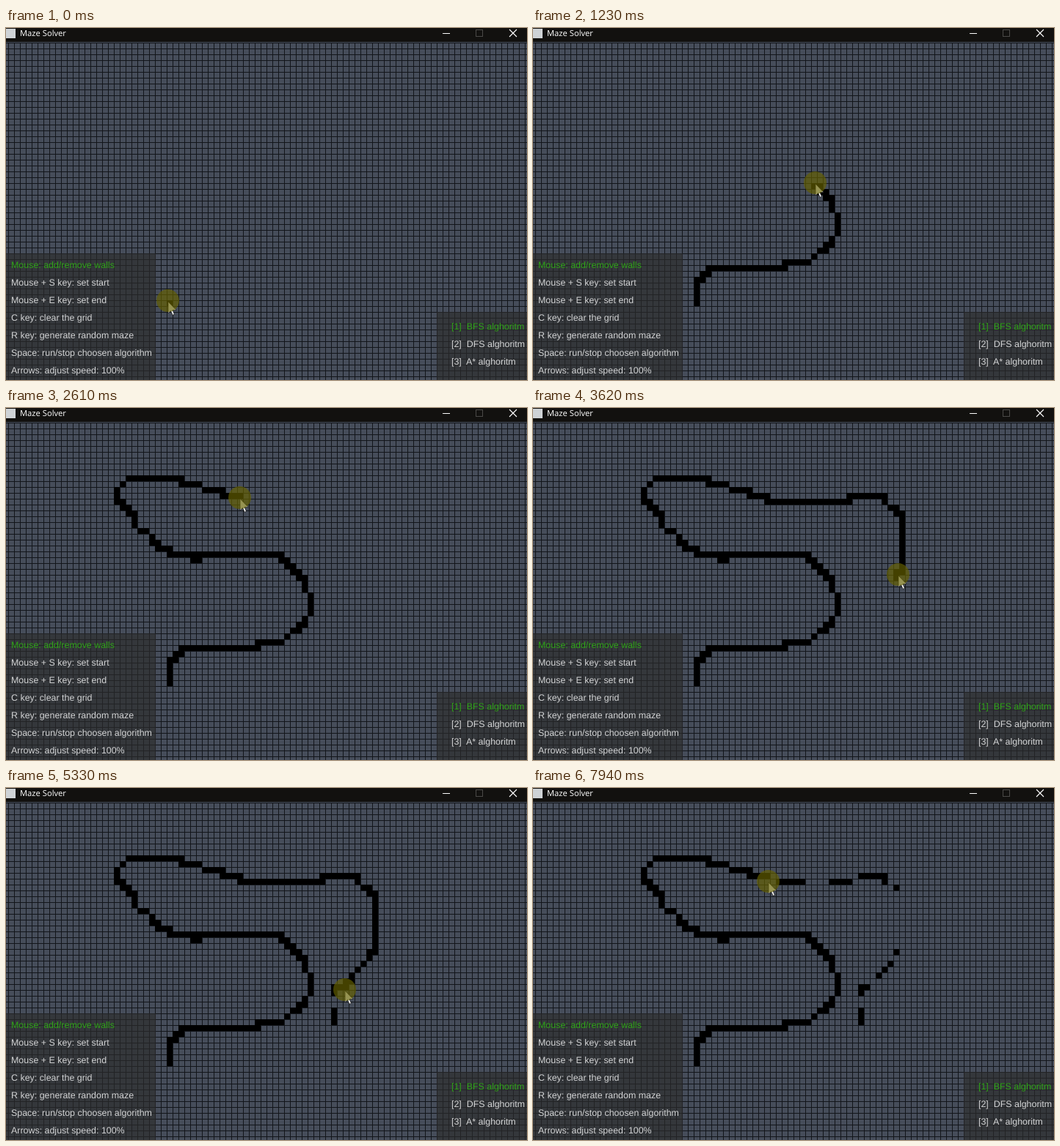
An HTML page that plays this animation: 710x481 px, repeating every 8 s.

```html
<!DOCTYPE html>
<html lang="en">
<head>
<meta charset="utf-8">
<title>Maze Solver</title>
<style>
  html, body { margin: 0; width: 100%; height: 100%; overflow: hidden; background: #464d5a; }
  svg { display: block; }
  text { white-space: pre; text-rendering: geometricPrecision; }
  .title { font: 11.2px "Open Sans", sans-serif; fill: #fff; }
  .help { font: 12.43px "Liberation Sans", Arial, sans-serif; fill: #d2d3d4; }
  .help.on { fill: #2fa318; }
  .panel { fill: rgba(44, 44, 44, .65); }
</style>
</head>
<body>
<svg id="stage" width="710" height="481" viewBox="0 0 710 481">
  <defs>
    <pattern id="grid" x="3" y="20" width="8" height="8" patternUnits="userSpaceOnUse">
      <path d="M0 0H8V1H1V8H0Z" fill="#12151a" shape-rendering="crispEdges"/>
    </pattern>
  </defs>
  <rect width="710" height="481" fill="#464d5a"/>
  <rect y="20" width="710" height="461" fill="url(#grid)"/>
  <g id="walls" shape-rendering="crispEdges"></g>
  <rect class="panel" y="308" width="204" height="173"/>
  <rect class="panel" x="587" y="388" width="123" height="93"/>
  <g id="labels"></g>

  <rect width="710" height="19" fill="#12110f"/>
  <rect y="1" width="13" height="13" fill="#cfd3d6"/>
  <text class="title" x="19" y="11">Maze Solver</text>
  <g fill="none" stroke="#fff">
    <path d="M595 7.5H605"/>
    <rect x="640.5" y="2.5" width="9" height="9" stroke="#4b4a48"/>
    <path d="M686 2L696 12M696 2L686 12" stroke-width="1.1"/>
  </g>

  <g id="cursor">
    <path d="M1 1V16.8L4.6 13.4L7.1 19.3L9.4 18.3L7 12.5H12Z" fill="#fff" stroke="#111" stroke-width=".7"/>
    <circle cx=".5" cy="-.5" r="15.5" fill="rgb(100,96,0)" fill-opacity=".68"/>
  </g>
</svg>
<script>
const LOOP = 8000, STEP = 77.1, CELL = 8, LEFT = 3, TOP = 20;
const SVG = "http://www.w3.org/2000/svg";
const byId = id => document.getElementById(id);

function make(tag, attrs) {
  const el = document.createElementNS(SVG, tag);
  for (const key in attrs) el.setAttribute(key, attrs[key]);
  return el;
}

// One stretch of the pointer's route, run at constant speed between two steps.
function leg(from, to, tool, d) {
  const path = make("path", { d });
  return { from, to, tool, path, length: path.getTotalLength() };
}

const legs = [
  leg(0, 16, "draw", `M220 373L224 346 240 328 346 324 379 316 408 290 412 281
    411.4 254.4 406 232 384 212`),
  leg(16, 34, "draw", `M384 212L376 204 363 199 267 203 258 206 248 202 225 197
    214 191 199 183 197 174 176 162 174 150 159 134 151 128 152 112 165 98 236 99 318 123`),
  leg(34, 47, "draw", "M318 123L326 126 430 125 440 121 474 122 498 146 503 150 503 222 497 228"),
  leg(47, 53, "draw", "M497 228L492.5 234.5 470 257 470 261 447 279 444 321"),
  leg(55, 57, "start", "M444 321V352"),
  leg(58, 69, "erase", "M444 352L454 335 454 302 447 297 447 287 461 276"),
  leg(69, 86, "erase", "M461 276L469 264 477 262 492 245 494 231 502 229 502 150 497 144"),
  leg(86, 103, "erase", `M497 144L486 139 470 135 444 127 436 121 406 121 400 126
    374 129 370 134 328 134 320 128`)
];

function tipAt(step) {
  const { from, to, path, length } = legs.findLast(l => l.from <= step);
  return path.getPointAtLength(length * Math.min(1, (step - from) / (to - from)));
}

const cells = new Map();
function addCell(c, r, on, off = Infinity, fill = "#000") {
  const el = byId("walls").appendChild(make("rect", {
    x: LEFT + c * CELL, y: TOP + r * CELL, width: CELL, height: CELL, fill
  }));
  cells.set(`${c},${r}`, { el, on, off });
}

// Every cell the pointer samples gains a wall, or loses it on the way back.
for (const { from, to, tool, path, length } of legs) {
  if (tool === "start") continue;
  for (let s = 0; s <= length; s += 2) {
    const p = path.getPointAtLength(s), step = from + (to - from) * s / length;
    const c = Math.floor((p.x - LEFT) / CELL), r = Math.floor((p.y - TOP) / CELL);
    const cell = cells.get(`${c},${r}`);
    if (tool === "draw" && !cell) addCell(c, r, step);
    if (tool === "erase" && cell) cell.off = Math.min(cell.off, step);
  }
}

const START_ON = 56, START_OFF = 60;
addCell(55, 41, START_ON, START_OFF, "#2fa318");

const addLabels = (x, y, lines) => lines.map((line, i) => {
  const el = byId("labels").appendChild(make("text", { class: "help", x, y: y + i * 24 }));
  el.textContent = line;
  return el;
});
const [mouseLabel, startLabel] = addLabels(7, 328, [
  "Mouse: add/remove walls", "Mouse + S key: set start", "Mouse + E key: set end",
  "C key: clear the grid", "R key: generate random maze",
  "Space: run/stop choosen algorithm", "Arrows: adjust speed: 100%"
]);
const [bfsLabel] = addLabels(607, 412, [
  "[1]  BFS alghoritm", "[2]  DFS alghoritm", "[3]  A* alghoritm"
]);
bfsLabel.classList.add("on");

function render(now) {
  const step = Math.floor((now % LOOP + 14) / STEP);
  for (const { el, on, off } of cells.values())
    el.style.display = step >= on && step < off ? "" : "none";
  const setting = step >= START_ON && step < START_OFF;
  mouseLabel.classList.toggle("on", !setting);
  startLabel.classList.toggle("on", setting);
  const tip = tipAt(step);
  byId("cursor").setAttribute("transform", `translate(${Math.round(tip.x)},${Math.round(tip.y)})`);
}

const begin = performance.now();
function tick() {
  render(performance.now() - begin);
  requestAnimationFrame(tick);
}
tick();
</script>
</body>
</html>
```
